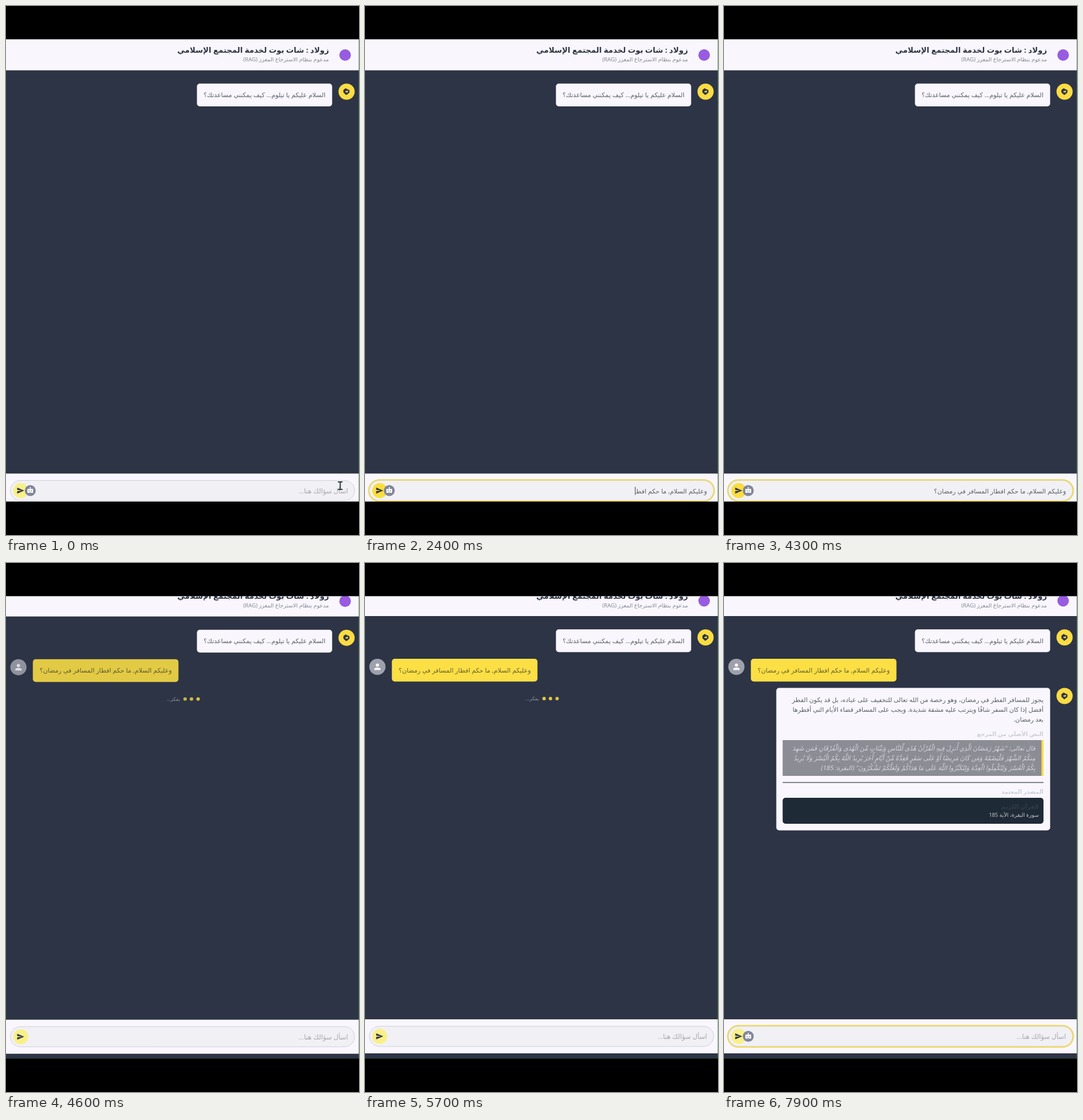
An HTML page that plays this animation: 611x917 px, repeating every 8 s.

```html
<!DOCTYPE html>
<html lang="ar">
<head>
<meta charset="utf-8">
<title>Chat</title>
<style>
html, body { margin: 0; width: 100%; height: 100%; overflow: hidden; background: #000; }
svg { display: block; width: 100vw; height: 100vh; }
text { font-family: "Noto Sans", "DejaVu Sans", sans-serif; font-size: 10.95px; direction: rtl; white-space: pre; fill: #5a5f69; }
.title { font-size: 13.2px; font-weight: 700; fill: #2d3446; }
.subtitle { font-size: 9.6px; fill: #858893; }
.label { font-size: 9.9px; font-weight: 700; fill: #cdced7; }
.quote text { font-size: 10.9px; fill: #d6d7dc; }
.ask { fill: #66602f; }
.hint { font-size: 11.6px; fill: #a6a7ae; }
.small { font-size: 9.3px; fill: #c3c6cc; }
.status { font-size: 8.6px; fill: #8f929d; }
</style>
</head>
<body>
<svg viewBox="0 0 611 917" preserveAspectRatio="none">
  <defs>
    <g id="bot">
      <circle r="14" fill="#fcdc43"/>
      <path d="M-5 -3 L-1.5 -5.5 L1 -4 L4.5 -2.5 V1.5 L-.5 5.5 L-5 1.5 Z" fill="#2d3446" stroke="#2d3446" stroke-linejoin="round"/>
      <path d="M-2 1 V-1 H.5 V-2.5 L3 -.2 L.5 2 V1 Z" fill="#fcdc43"/>
    </g>
  </defs>
  <rect width="611" height="917" fill="#2d3446"/>
  <g id="page">
    <rect y="38" width="611" height="54" fill="#f9f7fd"/>
    <circle cx="587" cy="65.5" r="10" fill="#985ce0"/>
    <text class="title" x="559" y="61.5">زولاد : شات بوت لخدمة المجتمع الإسلامي</text>
    <text class="subtitle" x="559" y="76.5">مدعوم بنظام الاسترجاع المعزز (RAG)</text>

    <use href="#bot" x="589.5" y="129"/>
    <rect x="330.5" y="115" width="234" height="39.5" rx="5" fill="#f9f7fd"/>
    <text x="553" y="138.5">السلام عليكم يا تيلوم... كيف يمكنني مساعدتك؟</text>

    <g id="question">
      <circle cx="21.5" cy="180" r="14" fill="#9ea1ab"/>
      <circle cx="21.5" cy="177" r="2.8" fill="#f9f7fd"/>
      <path d="M16 185.5 V184 Q16 181.3 21.5 181.3 T27 184 V185.5 Z" fill="#f9f7fd"/>
      <rect x="46.5" y="166" width="252" height="39.5" rx="5" fill="#fbdf45"/>
      <text id="sent" class="ask" x="287" y="189.5"></text>
    </g>

    <g id="thinking">
      <g id="dots" fill="#fcdc43">
        <circle cx="332.5" cy="235" r="3"/>
        <circle cx="321" cy="235" r="3"/>
        <circle cx="310" cy="235" r="3"/>
      </g>
      <text class="status" x="301" y="238">يفكر...</text>
    </g>

    <g id="answer">
      <use href="#bot" x="589.5" y="230.5"/>
      <rect x="90.5" y="216.5" width="474" height="247" rx="5" fill="#f9f7fd"/>
      <text x="553" y="241">يجوز للمسافر الفطر في رمضان، وهو رخصة من الله تعالى للتخفيف على عباده، بل قد يكون الفطر</text>
      <text x="553" y="258">أفضل إذا كان السفر شاقًا ويترتب عليه مشقة شديدة. ويجب على المسافر قضاء الأيام التي أفطرها</text>
      <text x="553" y="275">بعد رمضان.</text>
      <text class="label" x="553" y="300">النص الأصلي من المرجع</text>
      <rect x="101.5" y="307" width="451.5" height="62" fill="#8b8c94"/>
      <rect x="549.5" y="307" width="3.5" height="62" fill="#fcdc43"/>
      <g class="quote">
        <text transform="translate(539 325) skewX(-12)">قال تعالى: "شَهْرُ رَمَضَانَ الَّذِي أُنزِلَ فِيهِ الْقُرْآنُ هُدًى لِّلنَّاسِ وَبَيِّنَاتٍ مِّنَ الْهُدَى وَالْفُرْقَانِ فَمَن شَهِدَ</text>
        <text transform="translate(539 342) skewX(-12)">مِنكُمُ الشَّهْرَ فَلْيَصُمْهُ وَمَن كَانَ مَرِيضًا أَوْ عَلَى سَفَرٍ فَعِدَّةٌ مِّنْ أَيَّامٍ أُخَرَ يُرِيدُ اللَّهُ بِكُمُ الْيُسْرَ وَلَا يُرِيدُ</text>
        <text transform="translate(539 359) skewX(-12)">بِكُمُ الْعُسْرَ وَلِتُكْمِلُوا الْعِدَّةَ وَلِتُكَبِّرُوا اللَّهَ عَلَى مَا هَدَاكُمْ وَلَعَلَّكُمْ تَشْكُرُونَ" (البقرة: 185)</text>
      </g>
      <path d="M101.5 380.5 H553" stroke="#5a5c64" stroke-width="1.3"/>
      <text class="label" x="553" y="400">المصدر المعتمد</text>
      <rect x="101.5" y="407" width="451.5" height="45" rx="5" fill="#1f2a37"/>
      <text class="label" x="545" y="425.5" style="fill:#323b49">القرآن الكريم</text>
      <text class="small" x="545" y="439.5">سورة البقرة، الآية 185</text>
    </g>

    <rect y="791" width="611" height="59" fill="#f9f7fd"/>
    <rect x="7.5" y="803" width="596" height="35" rx="17.5" fill="#f1f0f4" stroke="#cfd0d7"/>
    <rect id="ring" x="6.5" y="802" width="598" height="37" rx="18.5" fill="none" stroke="#ecd968" stroke-width="2.5"/>
    <text id="hint" class="hint" x="592" y="825">اسأل سؤالك هنا...</text>
    <text id="draft" x="592" y="825"></text>
    <rect id="caret" y="814" width="1" height="14" fill="#33363f"/>
    <circle id="send" cx="25.5" cy="820.5" r="13"/>
    <path transform="translate(18.2 813.5) scale(.58)" d="M2 21 L23 12 L2 3 V10 L17 12 L2 14 Z" fill="#2d3446"/>
    <g id="helper">
      <circle cx="42" cy="820.5" r="9.5" fill="#81869a"/>
      <path d="M42 818 V815.5" stroke="#fff"/>
      <circle cx="42" cy="815.5" r="1.1" fill="#fff"/>
      <rect x="37" y="817.5" width="10" height="7" rx="1" fill="#fff"/>
      <path d="M39 820 h1.8 v1.6 h-1.8z M43.2 820 h1.8 v1.6 h-1.8z M40 823 h4 v.7 h-4z" fill="#81869a"/>
    </g>
  </g>
  <path id="mouse" d="M574.5 825 H582.5 M578.5 825 V838 M574.5 838 H582.5" fill="none" stroke="#243d38" stroke-width="2"/>
  <path d="M610.5 57 V859" stroke="#2c7a2c" stroke-opacity=".5"/>
  <rect width="611" height="57.5" fill="#000"/>
  <rect y="859" width="611" height="58" fill="#000"/>
  <path id="edge" d="M0 858.7 H611" stroke="#1d4a24" stroke-width=".8"/>
</svg>
<script>
const LOOP = 8000, FOCUS = 300, SEND = 4500, REPLY = 6500, REFOCUS = 7400;
const QUESTION = "وعليكم السلام, ما حكم افطار المسافر في رمضان؟";
// [time, characters typed]
const TYPING = [[350, 0], [1190, 13], [1400, 14], [2390, 25], [3550, 39], [4000, 45]];

const $ = id => document.getElementById(id);
const show = (id, on) => { $(id).style.display = on ? "" : "none"; };
const clamp = v => Math.max(0, Math.min(1, v));
const ease = v => 1 - (1 - clamp(v)) ** 3;

function typedCount(t) {
  for (let i = 1; i < TYPING.length; i++) {
    const [t0, n0] = TYPING[i - 1], [t1, n1] = TYPING[i];
    if (t < t1) return Math.floor(n0 + (n1 - n0) * clamp((t - t0) / (t1 - t0)));
  }
  return QUESTION.length;
}

function render(t) {
  const sent = t >= SEND;
  const focused = sent ? t >= REFOCUS : t >= FOCUS;
  const draft = sent ? "" : QUESTION.slice(0, typedCount(t));

  $("page").setAttribute("transform", `translate(0 ${19.5 * (1 - ease((t - SEND) / 150))})`);
  $("draft").textContent = draft;
  $("caret").setAttribute("x", 591 - (draft ? $("draft").getComputedTextLength() : 0));
  show("caret", focused && (sent ? t < REFOCUS + 500 : t < 4200));
  show("hint", !draft);
  show("ring", focused);
  show("helper", !sent || focused);
  show("mouse", t < FOCUS + 100);
  show("edge", sent);
  $("send").setAttribute("fill", draft ? "#fbdd3f" : "#f9f088");

  show("question", sent);
  $("question").setAttribute("opacity", ease((t - SEND) / 200));
  show("thinking", sent && t < REPLY);
  [...$("dots").children].forEach((dot, i) =>
    dot.setAttribute("opacity", 0.6 + 0.3 * Math.sin((t - 5500) / 1400 * 2 * Math.PI + i * 0.2)));
  show("answer", t >= REPLY);
  $("answer").setAttribute("opacity", ease((t - REPLY) / 300));
}

$("sent").textContent = QUESTION;
const start = performance.now();
function frame() {
  render((performance.now() - start) % LOOP);
  requestAnimationFrame(frame);
}
frame();
</script>
</body>
</html>
```
